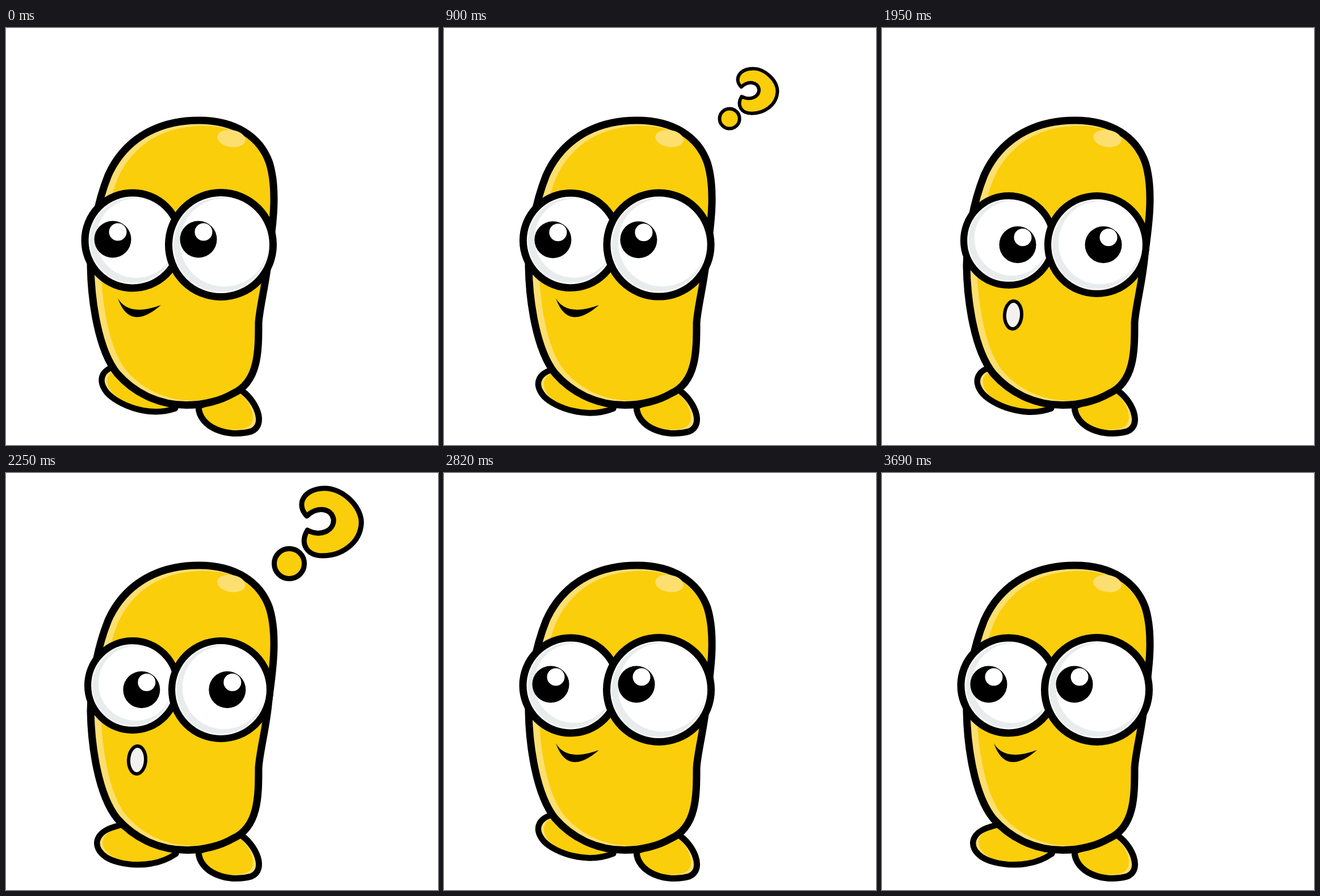
An HTML page that plays this animation: 761x736 px, repeating every 3720 ms.

```html
<!DOCTYPE html>
<html>
<head>
<meta charset="utf-8">
<style>
  html, body { margin: 0; width: 761px; height: 736px; overflow: hidden; background: #fff; }
  svg { display: block; }
  .skin { fill: #face0b; }
  .shine { fill: #fddf70; }
  .ink { stroke: #000; stroke-linejoin: round; }
  .line { fill: none; }
</style>
</head>
<body>
<svg width="761" height="736" viewBox="0 0 761 736">
  <g id="leftFoot"></g>
  <g id="rightFoot"></g>
  <g id="body"></g>
  <ellipse class="shine" cx="397" cy="195" rx="25" ry="15" transform="rotate(9 397 195)"/>
  <g id="eyes"></g>
  <g id="pupils"></g>
  <path id="smile" d="M197 477Q216 510 273 489Q218 537 197 477Z"/>
  <ellipse id="gasp" class="ink" cx="231" cy="506.5" rx="15" ry="24.5" fill="#f3f1ef" stroke-width="6" transform="rotate(3 231 506)"/>
  <g id="question" class="skin ink" stroke-width="9">
    <path d="M530 76C510 56 524 28 560 27C592 26 626 58 626 88C624 125 590 146 558 146C530 146 517 125 531 101C554 113 578 102 577 82C574 62 548 58 530 76Z"/>
    <circle cx="499" cy="160" r="26.5"/>
  </g>
  <g id="exclaim" class="skin ink" stroke-width="9">
    <path d="M578 38C610 33 640 62 621 88C610 102 580 114 551 129C520 128 514 108 538 87C562 66 582 54 578 38Z"/>
    <circle cx="497" cy="150" r="26.5"/>
  </g>
</svg>
<script>
const LOOP = 3720, CYCLE = 1860, STEP = 30;
const el = id => document.getElementById(id);
const clamp = v => Math.min(1, Math.max(0, v));
const ease = v => (1 - Math.cos(Math.PI * clamp(v))) / 2;
const backIn = v => v * v * (2.70158 * v - 1.70158);
const scaleAt = (x, y, scale) => `translate(${x} ${y}) scale(${scale}) translate(${-x} ${-y})`;
const show = (id, on) => el(id).setAttribute('visibility', on ? 'visible' : 'hidden');

// A light shape, a shrunken copy in the skin colour, then the outline:
// the light rim shows on the side away from the fixed point x, y.
function shaded(id, width, x, y, scale, d) {
  el(id).innerHTML = `<path class="shine" d="${d}"/>
    <path class="skin" d="${d}" transform="${scaleAt(x, y, scale)}"/>
    <path class="line ink" stroke-width="${width}" d="${d}"/>`;
}

shaded('leftFoot', 10.5, 300, 640, 0.93,
  'M300 672C262 706 203 705 178 693C150 678 155 652 185 639C225 618 290 625 300 672Z');
shaded('rightFoot', 11, 340, 650, 0.9,
  'M339 668C340 705 390 724 432 712C460 700 440 655 412 638Z');
shaded('body', 13, 480, 440, '.945 .965',
  `M340 163C404 163 448 192 464 238C480 290 468 360 463 400C459 448 447 490 445 520
   C445 570 445 625 400 645C378 658 348 665.5 318 665.5C266 665.5 224 642 196 610
   C162 568 150 480 149 420C150 370 160 310 180 260C205 204 258 163 340 163Z`);

const eyes = [{ x: 223, y: 375, r: 84 }, { x: 378.5, y: 382.5, r: 92 }];
el('eyes').innerHTML = eyes.map(({ r }) => `<g>
  <circle class="ink" r="${r}" fill="#fff" stroke-width="13"/>
  <circle r="${r - 9}" fill="#e8ecec"/>
  <circle cx="6" cy="-4" r="${r - 14}" fill="#fff"/></g>`).join('');
el('pupils').innerHTML = [188, 339].map(x =>
  `<circle cx="${x}" cy="373" r="32.5"/><circle cx="${x + 9}" cy="360" r="15.5" fill="#fff"/>`).join('');
const eyeNodes = [...el('eyes').children];

// Pops in with overshoot, pops out with anticipation.
function pop(id, t, start, end, span = 245) {
  const scale = 1 - backIn(t < end ? 1 - clamp((t - start) / span) : clamp((t - end) / span));
  show(id, scale > 0.01);
  el(id).setAttribute('transform', scaleAt(511, 160, scale));
}

function draw(time) {
  const t = Math.floor(time % LOOP / STEP) * STEP;
  const tap = (1 - Math.cos(t / 480 * 2 * Math.PI)) / 2;
  const look = ease((t - 820) / 450) - ease((t - 2233) / 450);

  el('leftFoot').setAttribute('transform', `rotate(${23 * (1 - tap)} 300 667)`);
  eyes.forEach(({ x, y }, i) =>
    eyeNodes[i].setAttribute('transform', `translate(${x} ${y}) scale(${1 - 0.06 * look})`));
  el('pupils').setAttribute('transform', `translate(${51 * look} ${9.5 * look})`);

  show('smile', look <= 0.5);
  show('gasp', look > 0.5);
  pop('question', t % CYCLE, 95, 700);
  pop('exclaim', t % CYCLE, 1010, 1540);
}

const begin = performance.now();
function tick() {
  draw(performance.now() - begin);
  requestAnimationFrame(tick);
}
tick();
</script>
</body>
</html>
```
